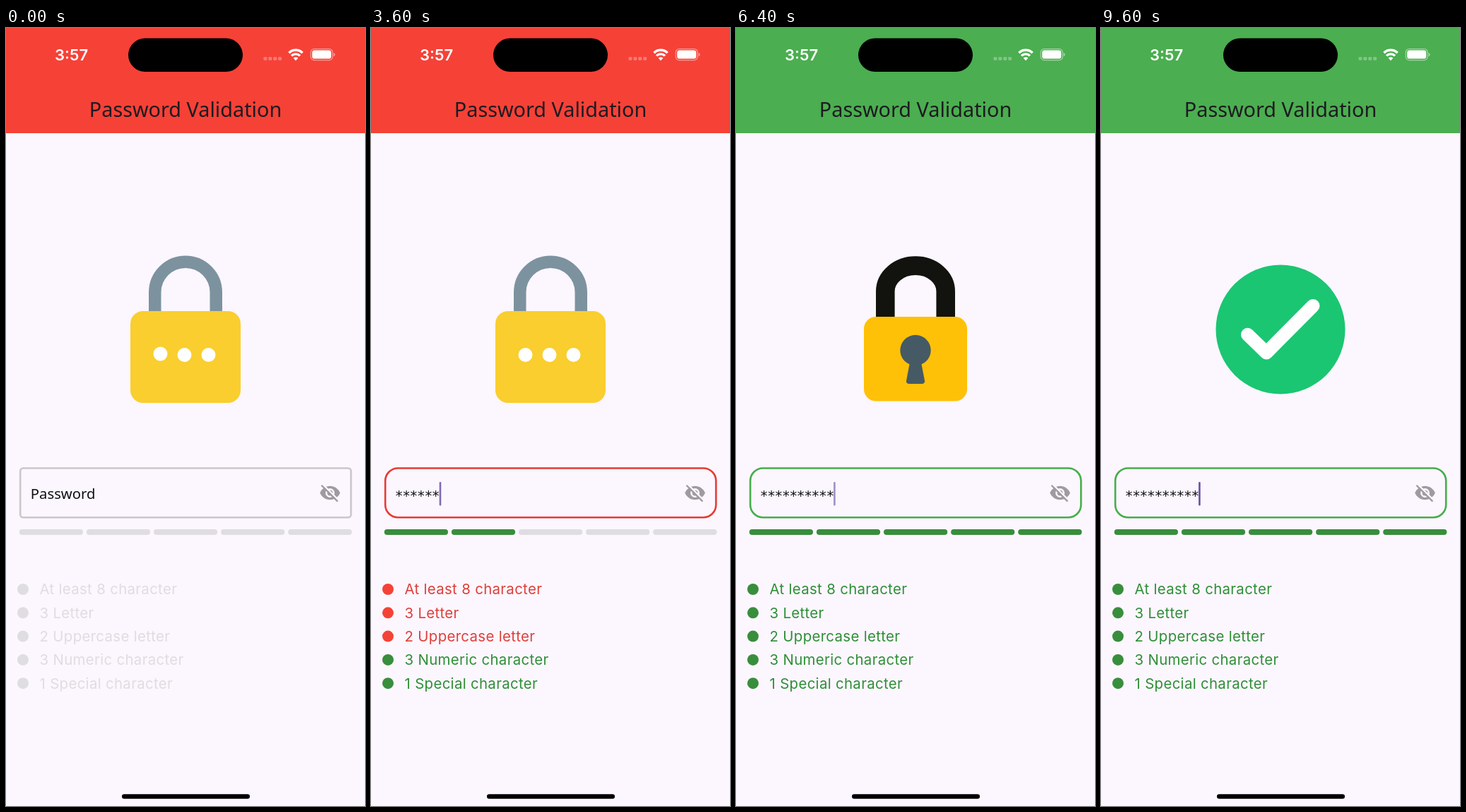
An HTML page that plays this animation: 508 px wide and 1102 px high, repeating every 9.7 s.

```html
<!DOCTYPE html>
<html lang="en">
<head>
<meta charset="utf-8">
<title>Password Validation</title>
<style>
  html, body { margin: 0; width: 100%; height: 100%; overflow: hidden; background: #fcf6fe; }
  svg { display: block; width: 100%; height: 100%; }
  text { white-space: pre; }
  .clock { font: 600 22px Inter, sans-serif; fill: #fff; text-anchor: middle; }
  .title { font: 400 28.8px "Noto Sans", sans-serif; fill: #1d1b20; text-anchor: middle; }
  .hint { font: 400 20.3px "Noto Sans", sans-serif; fill: #111; }
  .stars { font: 400 19.5px "DejaVu Sans", sans-serif; letter-spacing: .65px; fill: #111; }
  .rule { font: 400 20.4px Inter, sans-serif; letter-spacing: .33px; }
</style>
</head>
<body>
<svg viewBox="0 0 508 1102">
  <rect width="508" height="1102" fill="#fcf6fe"/>
  <rect id="header" width="508" height="149"/>

  <!-- status bar -->
  <text class="clock" x="92.5" y="46">3:57</text>
  <rect x="173" y="14.5" width="162" height="47.5" rx="23.75"/>
  <g id="signal" fill="#fff" opacity=".3"></g>
  <g fill="none" stroke="#fff" stroke-width="3.4">
    <path d="M400.4 35.2a13.6 13.6 0 0 1 19.2 0"/>
    <path d="M404 39.4a8.5 8.5 0 0 1 12 0"/>
  </g>
  <path d="M410 46.2l-3.4-3.6a4.9 4.9 0 0 1 6.8 0z" fill="#fff"/>
  <rect x="431.2" y="29.6" width="31" height="16" rx="5" fill="none" stroke="#fff" stroke-opacity=".45" stroke-width="1.3"/>
  <rect x="433.2" y="31.6" width="27" height="12" rx="3.4" fill="#fff"/>
  <path d="M463.6 35v5.4q2-.8 2-2.7t-2-2.7z" fill="#fff" opacity=".5"/>

  <text class="title" x="254" y="126">Password Validation</text>

  <!-- closed lock with bouncing dots -->
  <g id="idle">
    <path d="M210.75 404V374.5a43.25 43.25 0 0 1 86.5 0V404" fill="none" stroke="#7c939f" stroke-width="17.5"/>
    <rect x="176" y="401" width="156" height="130" rx="18" fill="#f9ce2e"/>
    <g id="dots" fill="#fff"></g>
  </g>

  <!-- lock that turns into the check badge -->
  <g id="done">
    <path id="shackle" d="M211.3 412V373a42.7 36.4 0 0 1 85.4 0V412" fill="none" stroke="#12130e" stroke-width="26.6"/>
    <rect id="body"/>
    <g id="hole">
      <circle id="knob"/>
      <path id="stem" d="M-7 12L-13 43Q-13.400 47.500 -9 47.500H9Q13.400 47.500 13 43L7 12Z"/>
    </g>
    <path id="check" d="M207.500 434.300L234 460L300 393.500" pathLength="1" stroke-dasharray="1 2" fill="none"
      stroke="#fff" stroke-width="19" stroke-linecap="round" stroke-linejoin="round"/>
  </g>

  <!-- field -->
  <rect id="field" x="20.200" y="623.500" width="468" height="69.800" fill="none" stroke-width="2.6"/>
  <text id="hint" class="hint" x="34.800" y="667.300">Password</text>
  <text id="stars" class="stars" x="34.800" y="668.500"></text>
  <rect id="caret" y="643" width="2.600" height="33.500" rx="1" fill="#6750a4"/>
  <g transform="translate(443 643) scale(1.2926)">
    <path d="M1 12C2.730 7.600 7 4.500 12 4.500S21.270 7.600 23 12C21.270 16.400 17 19.500 12 19.500S2.730 16.400 1 12Z" fill="#9e9ba0"/>
    <circle cx="12" cy="12" r="5" fill="#fcf6fe"/>
    <circle cx="12" cy="12" r="3" fill="#9e9ba0"/>
    <path d="M3.800 2.400L21.600 20.200" stroke="#fcf6fe" stroke-width="1.8"/>
    <path d="M2.640 3.640L20.360 21.360" stroke="#9e9ba0" stroke-width="1.8"/>
  </g>

  <g id="bars"></g>
  <g id="rules"></g>
  <rect x="164" y="1085.300" width="181" height="6.400" rx="3.200"/>
</svg>

<script>
const LOOP = 9700, BLINK = 900, FOCUS = 500;
const KEYS = [800, 1150, 1480, 2250, 2700, 3130, 3625, 5200, 5550, 5900];
const FIRST = KEYS[0], SOLVED = KEYS[9];
const GRAY = '#dfdde1', RED = '#f44336', GREEN = '#388e3c';

// label and the key press that satisfies it
const RULES = [
  ['At least 8 character', 8],
  ['3 Letter', 10],
  ['2 Uppercase letter', 7],
  ['3 Numeric character', 3],
  ['1 Special character', 4]
].map(([label, key]) => ({ label, time: KEYS[key - 1] }));
const PASSES = RULES.map(r => r.time).sort((a, b) => a - b);

const $ = id => document.getElementById(id);
const set = (el, attrs) => { for (const k in attrs) el.setAttribute(k, attrs[k]); return el; };
const add = (parent, tag, attrs) =>
  parent.appendChild(set(document.createElementNS('http://www.w3.org/2000/svg', tag), attrs));
const show = (el, on) => set(el, { visibility: on ? 'visible' : 'hidden' });

const lerp = (a, b, k) => a + (b - a) * k;
const ramp = (t, from, to) => Math.min(1, Math.max(0, (t - from) / (to - from)));
const ease = k => k * k * (3 - 2 * k);
const rgb = hex => [1, 3, 5].map(i => parseInt(hex.slice(i, i + 2), 16));
const mix = (a, b, k) => {
  const to = rgb(b);
  return `rgb(${rgb(a).map((v, i) => Math.round(lerp(v, to[i], k)))})`;
};
// idle -> wrong -> right, each change a short fade
const tone = (t, right, idle, wrong, ok) => t < right
  ? mix(idle, wrong, ramp(t, FIRST, FIRST + 200))
  : mix(wrong, ok, ramp(t, right, right + 200));

for (let i = 0; i < 4; i++)
  add($('signal'), 'rect', { x: 364.5 + i * 6.9, y: 41, width: 4.9, height: 4.7, rx: 1.3 });
const dots = [0, 1, 2].map(i => add($('dots'), 'circle', { cx: 218.5 + i * 34, r: 10 }));
const bars = PASSES.map((_, i) =>
  add($('bars'), 'rect', { x: 18.8 + i * 95.1, y: 710, width: 90.2, height: 8, rx: 4 }));
RULES.forEach((r, i) => {
  const y = 795 + i * 33.3;
  r.dot = add($('rules'), 'circle', { cx: 24, cy: y, r: 8 });
  r.text = add($('rules'), 'text', { class: 'rule', x: 47.5, y: y + 7.3 });
  r.text.textContent = r.label;
});

function drawIdle(t) {
  dots.forEach((dot, i) => {
    const k = ramp((t + 50) % 2000, i * 350, i * 350 + 700);
    set(dot, { cy: 463 - 27 * Math.sin(Math.PI * k) ** 2 });
  });
}

function drawDone(t) {
  const drop = ease(ramp(t, 7050, 7450));
  set($('shackle'), { transform: `translate(0 ${86 * drop})` });
  show($('shackle'), t >= SOLVED && drop < 1);

  const round = ease(ramp(t, 7400, 7880));
  const k = ramp(t, 7900, 8300);
  const grow = ease(k) + .25 * Math.sin(Math.PI * k) * k;
  const w = lerp(146, 160, round) + 23 * grow;
  const h = lerp(119.5, 160, round) + 23 * grow;
  const cy = lerp(468.8, 431, round) - 4 * ease(k);
  set($('body'), {
    x: 254 - w / 2, y: cy - h / 2, width: w, height: h,
    rx: lerp(17, 80, round) + 11.5 * grow,
    fill: mix('#ffc107', '#1ac672', ramp(t, 7650, 8250))
  });

  const shrink = 1 - ease(ramp(t, 7910, 8150));
  set($('hole'), {
    transform: `translate(${lerp(254, 252, round)} ${lerp(456.5, 422, round)})`,
    fill: mix('#455a64', '#ffffff', ramp(t, 7500, 8130))
  });
  set($('knob'), { r: lerp(21.7, 24, round) * shrink });
  set($('stem'), { transform: `scale(1 ${1 - ease(ramp(t, 7250, 7600))})` });

  const draw = ease(ramp(t, 8200, 8600));
  set($('check'), { 'stroke-dashoffset': 1 - draw });
  show($('check'), t >= SOLVED && draw > 0);
}

function drawField(t) {
  const typed = KEYS.filter(k => k <= t).length;
  set($('field'), {
    rx: lerp(4, 18, ramp(t, FIRST, FIRST + 200)),
    stroke: tone(t, SOLVED, '#cac7cb', '#e53c35', '#46ae4b')
  });
  show($('hint'), !typed);
  $('stars').textContent = '*'.repeat(typed);

  const phase = (t - (typed ? KEYS[typed - 1] : FOCUS)) / BLINK % 1;
  const glow = 1 - ramp(phase, .5, .65) + ramp(phase, .85, 1);
  set($('caret'), { x: 34.4 + typed * 10.35 + (typed ? .2 : 0), opacity: t < FOCUS ? 0 : glow });
}

function render(t) {
  const solved = t >= SOLVED;
  set($('header'), { fill: solved ? '#4bae50' : '#f64137' });
  show($('idle'), !solved);
  show($('done'), solved);
  drawIdle(t);
  drawDone(t);
  drawField(t);
  bars.forEach((bar, i) => set(bar, { fill: mix(GRAY, GREEN, ramp(t, PASSES[i], PASSES[i] + 200)) }));
  for (const r of RULES) {
    set(r.dot, { fill: tone(t, r.time, GRAY, RED, GREEN) });
    set(r.text, { fill: tone(t, r.time, GRAY, '#dd403c', '#2e8f37') });
  }
}

const start = performance.now();
function tick() {
  render((performance.now() - start) % LOOP);
  requestAnimationFrame(tick);
}
tick();
</script>
</body>
</html>
```
